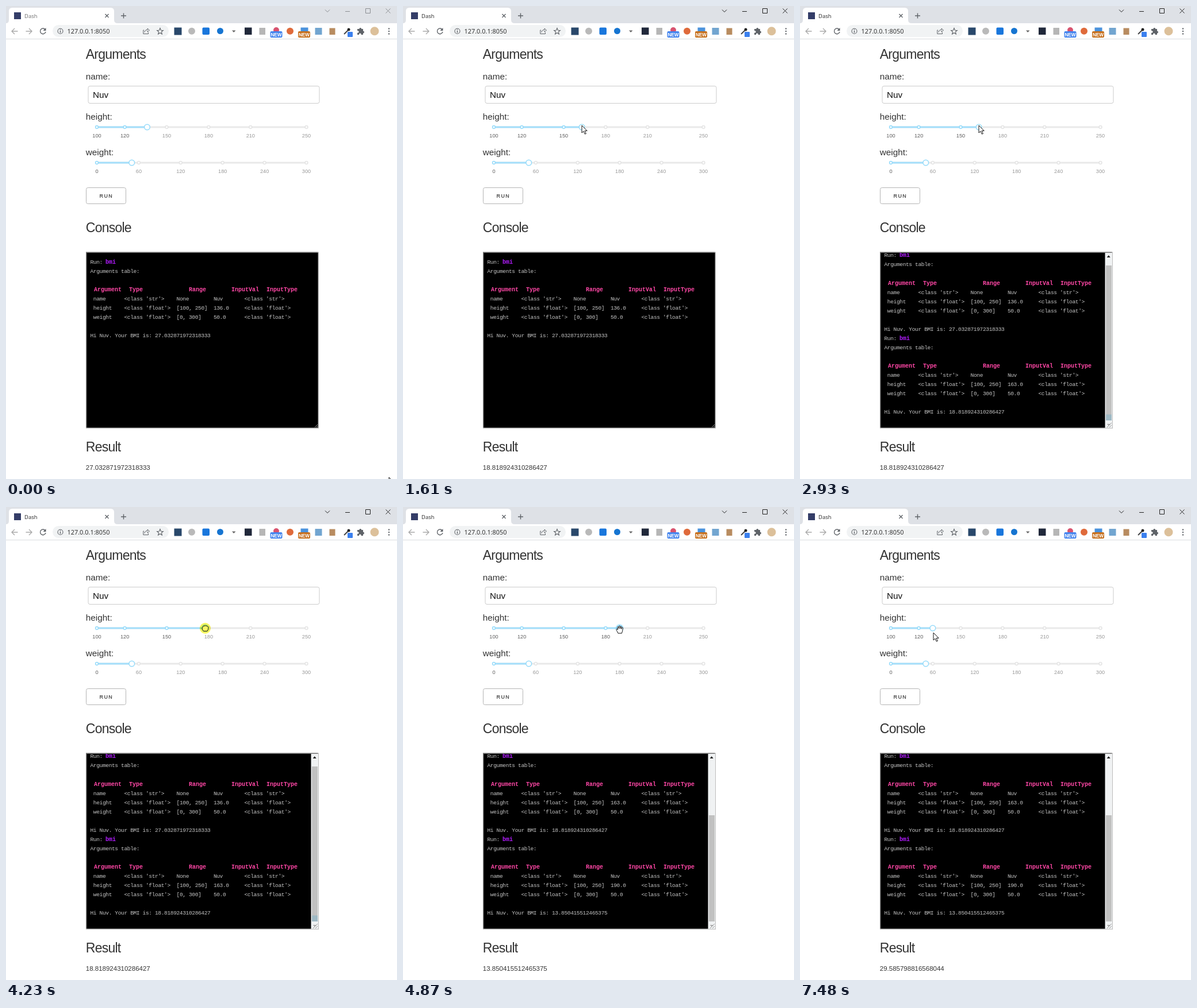
Animation, 680 px wide and 824 px high, one loop 8 s. Source, as an HTML page:

```html
<!DOCTYPE html>
<html lang="en">
<head>
<meta charset="utf-8">
<title>Dash</title>
<style>
  html, body { margin: 0; width: 100%; height: 100%; overflow: hidden; background: #fff; }
  svg { display: block; width: 100%; height: 100%; }
  text { font-family: "Liberation Sans", Arial, sans-serif; fill: #333; white-space: pre; }
  .ui { font-family: "Noto Sans", "Open Sans", sans-serif; }
  .h { font-size: 23px; letter-spacing: -.77px; }
  .label { font-size: 15.3px; }
  .mark { font-size: 9.2px; text-anchor: middle; }
  .badge { font-size: 8.2px; font-weight: bold; fill: #fff; text-anchor: middle; }
  .mono { font: 9.6px "Liberation Mono", monospace; letter-spacing: -.4px; fill: #c4c4c4; }
  .mono.b { font-weight: bold; font-size: 10px; letter-spacing: 0; }
  .line { fill: none; stroke: #5f6368; stroke-width: 1.4; }
  #press { mix-blend-mode: multiply; }
</style>
</head>
<body>
<svg id="stage" viewBox="0 0 680 824">
  <defs>
    <clipPath id="screen"><rect x="141" y="430" width="401" height="304"/></clipPath>
    <filter id="blur" x="-50%" y="-50%" width="200%" height="200%"><feGaussianBlur stdDeviation="1.2"/></filter>
  </defs>
  <rect width="680" height="824" fill="#fff"/>
  <g id="chrome"></g>
  <g id="page"></g>
  <g id="sliders"></g>
  <g id="console" clip-path="url(#screen)"></g>
  <g id="bar"></g>
  <text id="result" x="138.8" y="808" font-size="11.5"></text>
  <path id="cursor" fill="#fff" stroke="#111" stroke-linejoin="round"/>
  <circle id="press" r="9.5" fill="#fdf862"/>
</svg>
<script>
const LOOP = 8000, NAME = 'Nuv', LEFT = 138.8;
const BMI = {
  136: '27.032871972318333', 163: '18.818924310286427',
  190: '13.850415512465375', 130: '29.585798816568044'
};
const SHAPES = {
  arrow: 'M0 0V13L3 10.2L5.3 15.2L7.4 14.3L5.1 9.4H9.2Z',
  open: 'M-3 6C-4 3-6 1-6-1C-5.4-2.2-4-1.4-3.3 0L-4-4.5C-3.6-6-2.4-5.6-2.1-4.6L-1.5-2V-6C-1-7.2 .3-7 .5-6V-2L1.3-5.6C1.8-6.6 3-6.2 3-5L2.6-1.5L3.8-4C4.6-4.8 5.6-4.2 5.3-3C5 0 4.6 3 3.4 6Z',
  fist: 'M-3 5C-4 3-6 1.5-5-1L-4-2C-4-4-2-4.6-1.4-3.4C-.8-5 .8-5 1.4-3.6C2.2-4.6 3.6-4.2 3.8-3C5-3.2 5.6-2 5.4-.5C5.2 2 4.6 3 3.6 5Z'
};

const $ = id => document.getElementById(id);
const esc = s => s.replace(/</g, '&lt;').replace(/>/g, '&gt;');
const text = (x, y, s, cls = '', more = '') => `<text x="${x}" y="${y}" class="${cls}" ${more}>${esc(s)}</text>`;
const rect = (x, y, w, h, fill, more = '') => `<rect x="${x}" y="${y}" width="${w}" height="${h}" fill="${fill}" ${more}/>`;
const circle = (x, y, r, fill, more = '') => `<circle cx="${x}" cy="${y}" r="${r}" fill="${fill}" ${more}/>`;
const line = (d, more = '') => `<path class="line" d="${d}" ${more}/>`;
const set = (el, html) => { if (el.html !== html) el.innerHTML = el.html = html; };

// Motion in equal steps: [start, end, steps, from, to, ease]
const inOut = p => p * p * (3 - 2 * p);
const out = a => p => 1 - (1 - p) ** a;
const cursorMoves = [
  [70, 590, 9, [666, 821], [254, 217], inOut],
  [730, 860, 3, [254, 217], [246, 212], inOut],
  [1070, 1400, 6, [246, 212], [311, 208], out(1.4)],
  [4150, 4510, 6, [311, 208], [377, 214], out(1.9)],
  [6670, 6670, 1, [377, 214], [378, 217], inOut],
  [6740, 7220, 8, [378, 217], [232, 219], inOut]
];
const heightMoves = [
  [1070, 1400, 6, [136], [163], p => p ** 1.7],
  [4150, 4510, 6, [163], [190], out(1.9)],
  [6740, 7220, 8, [190], [130], inOut]
];
function track(moves, t) {
  let at = moves[0][3];
  for (const [start, end, n, from, to, ease] of moves) {
    if (t < start) break;
    const step = t >= end ? n : Math.floor((t - start) / (end - start) * (n - 1) + 1e-6) + 1;
    const p = ease(step / n);
    at = from.map((v, i) => v + (to[i] - v) * p);
  }
  return at;
}
const within = (t, spans) => spans.some(([a, b]) => t >= a && t < b);
const latest = (t, list) => list.reduce((v, [at, next]) => t >= at ? next : v, list[0][1]);

function chrome(title, active) {
  const ink = active ? '#222' : '#8b8e92';
  const stroke = `style="stroke:${ink};stroke-width:1"`;
  const badge = (x, fill) => rect(x - 10.5, 44, 21, 11, fill, 'rx="2"') + text(x, 52.6, 'NEW', 'badge');
  return rect(0, 0, 680, 30, '#dee1e6') +
    '<path d="M0 30Q5 30 5 24V9Q5 3 11 3H182Q188 3 188 9V24Q188 30 194 30Z" fill="#fff"/>' +
    rect(14, 11, 12, 12, '#343d68') +
    text(32, 20.5, title, 'ui', `font-size="9.5" style="fill:${active ? '#333' : '#777'}"`) +
    line('M172.5 14L178.5 20M178.5 14L172.5 20') + line('M200 17H209M204.5 12.5V21.5') +
    line('M555 6.5L559 10.5L563 6.5', stroke) + line('M590 9.5H598', stroke) +
    line('M625.5 4.5H633.5V12.5H625.5Z', stroke) + line('M660.5 4.5L668.5 12.5M668.5 4.5L660.5 12.5', stroke) +
    rect(0, 57, 680, 1, '#dadce0') +
    line('M20.5 44H10.5M15 39L10 44L15 49', 'style="stroke:#aaa"') +
    line('M34.5 44H44.5M40 39L45 44L40 49', 'style="stroke:#aaa"') +
    line('M68.2 41A4.8 4.8 0 1 0 69 45') + '<path d="M69.5 38V43H64.5Z" fill="#5f6368"/>' +
    rect(81, 33, 202, 21, '#f1f3f4', 'rx="10.5"') +
    circle(94.5, 43.8, 4.5, 'none', 'stroke="#5f6368" stroke-width="1.1"') + line('M94.5 43V46.4M94.5 40.8V42') +
    text(106.5, 47.5, '127.0.0.1:8050', 'ui', 'font-size="10.9"') +
    line('M240 42H238.8V48.5H247.5V46M241 46Q241 41.5 246 41.5V39L249.5 42.3L246 45.3V43', 'style="stroke-width:1"') +
    line('M268 38.5L269.5 42.2L273.4 42.4L270.4 45L271.4 48.9L268 46.7L264.6 48.9L265.6 45L262.6 42.4L266.5 42.2Z', 'style="stroke-width:1.1"') +
    rect(292.5, 37.5, 13, 13, '#29486b') + circle(323, 43.7, 6, '#b9b9b9') +
    rect(341.5, 37.5, 12.5, 12.5, '#1976dc', 'rx="2"') + circle(372.5, 43.5, 5.5, '#1675d1') +
    '<path d="M393 42.5H399.5L396.2 46Z" fill="#666"/>' +
    rect(415, 37.5, 12.5, 12.5, '#20283a') + rect(440.5, 38, 10.5, 12, '#b6b6b6') +
    circle(470, 42, 5, '#d9536f') + badge(470, '#4384ee') +
    circle(494, 43.8, 6, '#df6a3b') + rect(512.5, 37.5, 13, 9, '#4a92dd') + badge(518.5, '#c66f1c') +
    rect(537.5, 38, 12, 12, '#72a5d0') + rect(562.5, 38.5, 10, 11.5, '#b88c60') +
    line('M588 49L594.5 42.5', 'style="stroke:#444;stroke-width:2"') + circle(596, 41, 2.5, '#222') +
    rect(594, 45, 9, 9, '#3b80ee', 'rx="1"') +
    '<path d="M611 40H614.3A2 2 0 1 1 618.3 40H621V43.5A2 2 0 1 1 621 47.5V50H617.5A1.8 1.8 0 1 0 614.2 50H611V46.5A1.8 1.8 0 1 0 611 43.3Z" fill="#5f6368"/>' +
    circle(641, 43.7, 7.5, '#dcc09a') +
    [39.5, 44, 48.5].map(y => circle(666, y, 1.2, '#5f6368')).join('');
}

function page() {
  return text(LEFT, 92, 'Arguments', 'h') + text(LEFT, 394, 'Console', 'h') + text(LEFT, 776, 'Result', 'h') +
    text(LEFT, 128, 'name:', 'label') + text(LEFT, 198, 'height:', 'label') + text(LEFT, 260, 'weight:', 'label') +
    rect(143, 139.5, 402, 30, '#fff', 'rx="3" stroke="#ccc"') +
    text(151, 160, NAME, 'label', 'style="fill:#111"') +
    rect(139.5, 316.5, 69, 28, '#fff', 'rx="3" stroke="#b5b5b5"') +
    text(162.5, 334, 'RUN', '', 'font-size="9" font-weight="bold" letter-spacing="1.4" style="fill:#555"') +
    rect(139, 428.5, 405, 307.5, '#bdbdbd') + rect(139, 428.5, 403.5, 306, '#767676') + rect(140.5, 430, 402, 304.5, '#000');
}

function slider(y, min, max, marks, value, glow) {
  const at = v => 158 + (v - min) / (max - min) * 364.5;
  const x = at(value), blue = '#96dbfa';
  return rect(156, y - 1.5, 368, 3, '#e9e9e9', 'rx="1.5"') +
    rect(158, y - 1.5, x - 158, 3, '#a4dffb', 'rx="1.5"') +
    marks.map(v => circle(at(v), y, 2.4, '#fff', `stroke="${v <= value ? blue : '#e4e4e4'}" stroke-width="1.5"`) +
      text(at(v), y + 18, String(v), 'mark', `style="fill:${v <= value ? '#5c5c5c' : '#999'}"`)).join('') +
    (glow ? circle(x, y, 5.2, 'none', 'stroke="#57c5f7" stroke-width="1.6" filter="url(#blur)"') : '') +
    circle(x, y, 4.8, '#fff', `stroke="${glow ? '#7fd2f9' : blue}" stroke-width="1.5"`);
}

function block(y, height) {
  const row = n => y + n * 16.05;
  const cell = (c, r, s) => text(146.5 + c * 5.36, row(r), s, 'mono');
  const bold = (x, r, s, fill = '#ff47a6') => text(x, row(r), s, 'mono b', `style="fill:${fill}"`);
  const heads = [[153, 'Argument'], [214, 'Type'], [318, 'Range'], [392, 'InputVal'], [453, 'InputType']];
  const rows = [
    ['name', 'str', 'None', NAME],
    ['height', 'float', '[100, 250]', height + '.0'],
    ['weight', 'float', '[0, 300]', '50.0']
  ];
  return cell(0, 0, 'Run:') + bold(173, 0, 'bmi', '#b21cff') + cell(0, 1, 'Arguments table:') +
    heads.map(([x, s]) => bold(x, 3, s)).join('') +
    rows.map(([arg, type, range, val], i) => {
      const cls = `<class '${type}'>`;
      return cell(1, i + 4, arg) + cell(11, i + 4, cls) + cell(28, i + 4, range) +
        cell(40, i + 4, val) + cell(50, i + 4, cls);
    }).join('') +
    cell(0, 8, `Hi ${NAME}. Your BMI is: ${BMI[height]}`);
}

function scrollbar(runs) {
  if (runs < 2) return line('M537 734L542 729M540 734L542 732', 'style="stroke:#999;stroke-width:1"');
  const top = runs === 2 ? 452 : 537;
  return rect(530.5, 430, 12.5, 305, '#f0f2f3') +
    '<path d="M533.7 438L536.7 434.3L539.7 438Z" fill="#111"/>' +
    rect(532, top, 10, 722 - top, '#c1c1c1') +
    (runs === 2 ? rect(532, 711.5, 10, 10.5, '#9fb9c4') : '') +
    '<path d="M533.7 728H539.7L536.7 731Z" fill="#aaa"/>' +
    line('M534 734L542 726M538 734L542 730', 'style="stroke:#999;stroke-width:1"');
}

const presses = [[1070, 1540], [3940, 4590], [6670, 7480]];
const hovers = [[860, 1610], [4590, 6670]];
const logged = [136, 163, 190];

function draw(t) {
  const [x, y] = track(cursorMoves, t);
  const [height] = track(heightMoves, t);
  const busy = within(t, [[2810, 2930], [4740, 4870]]);
  const pressed = within(t, presses);
  const runs = latest(t, [[0, 1], [2870, 2], [4800, 3]]);
  const shape = latest(t, [[0, 'arrow'], [4150, 'fist'], [4590, 'open'], [6670, 'arrow']]);

  set($('chrome'), chrome(busy ? 'Updating...' : 'Dash', t >= 1070));
  set($('sliders'),
    slider(211, 100, 250, [100, 120, 150, 180, 210, 250], height, pressed || within(t, hovers)) +
    slider(273, 0, 300, [0, 60, 120, 180, 240, 300], 50, false));
  const top = runs > 1 ? 437.4 : 449;
  set($('console'), logged.slice(Math.max(0, runs - 2), runs).map((h, i) => block(top + i * 144.5, h)).join(''));
  set($('bar'), scrollbar(runs));
  set($('result'), BMI[latest(t, [[0, 136], [1610, 163], [4660, 190], [7480, 130]])]);

  const place = `translate(${x} ${y})`;
  $('press').setAttribute('visibility', pressed ? 'visible' : 'hidden');
  $('press').setAttribute('transform', place);
  $('cursor').setAttribute('d', SHAPES[shape]);
  $('cursor').setAttribute('transform', place);
}

set($('page'), page());
const begin = performance.now();
function tick() {
  draw((performance.now() - begin) % LOOP);
  requestAnimationFrame(tick);
}
tick();
</script>
</body>
</html>
```
